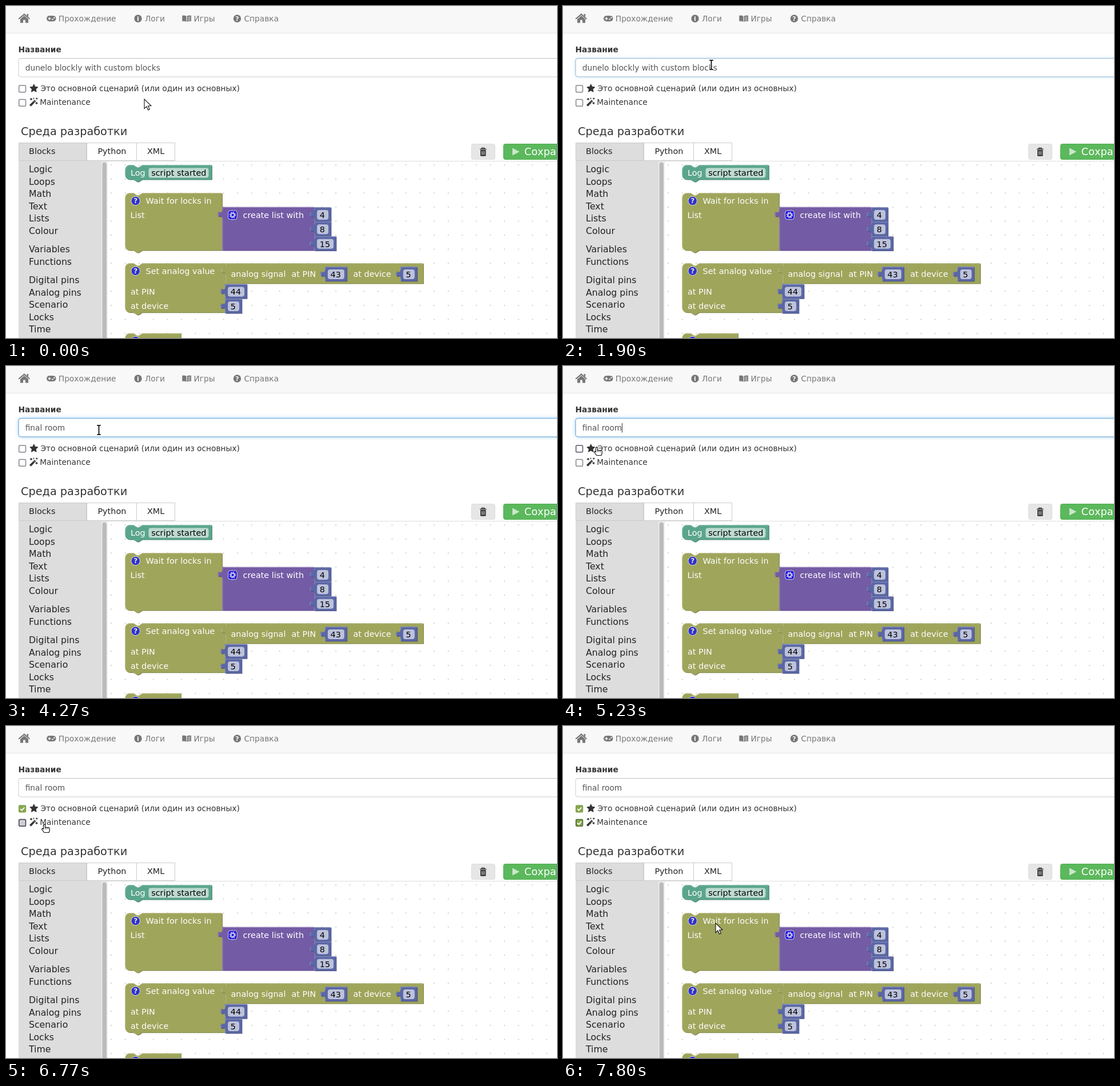
These frames come from a looping animation (964 px wide and 581 px high, 8000 ms). An HTML page:

```html
<!DOCTYPE html>
<html lang="ru">
<head>
<meta charset="utf-8">
<style>
html, body { margin: 0; width: 100%; height: 100%; overflow: hidden; background: #fff; }
svg { display: block; position: fixed; left: 0; top: 0; width: 100%; height: 100%; }
text { font-family: "DejaVu Sans", sans-serif; white-space: pre; }
</style>
</head>
<body>
<svg id="stage" viewBox="0 0 964 581"></svg>
<script>
const LOOP = 8000;
const stage = document.getElementById('stage');

const text = (x, y, s, size, fill, extra = '') =>
  `<text x="${x}" y="${y}" font-size="${size}" fill="${fill}" ${extra}>${s}</text>`;
const rect = (x, y, w, h, fill, extra = '') =>
  `<rect x="${x}" y="${y}" width="${w}" height="${h}" fill="${fill}" ${extra}/>`;
const path = (d, fill, extra = '') => `<path d="${d}" fill="${fill}" ${extra}/>`;

// Blocks
const OLIVE = ['#9fa55b', '#7f8449', '#bcc08c'];
const TEAL = ['#5ba58c', '#498470', '#8cc0ae'];
const PURPLE = ['#745ba5', '#5d4984', '#9e8cc0'];
const BLUE = ['#5b67a5', '#495284', '#8c95c0'];
const TAB_UP = 'V20c0-10-8 2.5-8-7.5s8 2.5 8-7.5';

function shape(x, y, [fill, dark, light], body, shine) {
  return `<g transform="translate(${x} ${y})">` +
    path(body, dark, 'transform="translate(1 1)"') + path(body, fill) +
    path(shine, 'none', `stroke="${light}"`) + '</g>';
}
function stack(x, y, w, h, color) {
  const top = `A8 8 0 0 1 8 0H15l6 4h3l6-4H${w}`;
  return shape(x, y, color,
    `M0 8${top}V${h}H29.5l-6 4h-3l-6-4H8A8 8 0 0 1 0 ${h - 8}Z`,
    `M.5 ${h - 8}V8A7.5 7.5 0 0 1 8 .5H15l6 4h3l6-4H${w}`);
}
function value(x, y, w, h, color) {
  return shape(x, y, color,
    `M0 0H${w}V${h}H0${TAB_UP}Z`,
    `M.5 ${h}V20M-6.8 15.5q-1.6-6.5 1.8-5.6M.5 5V.5H${w}`);
}
const label = (x, y, s) => text(x, y, s, 14.42, '#fff');
const field = (x, y, w, s) =>
  rect(x, y, w, 17, '#fff', 'rx="4" fill-opacity=".6"') + text(x + 4.7, y + 13.8, s, 14.42, '#000');
function number(x, y, n) {
  const w = n > 9 ? 38 : 29;
  return value(x, y, w, 25, BLUE) + field(x + 4.7, y + 4.7, w - 9, n);
}
const help = y => `<g opacity=".7"><circle cx="226.7" cy="${y}" r="7.8" fill="#00f" stroke="#fff"/>` +
  text(226.7, y + 4.3, '?', 12, '#fff', 'text-anchor="middle" font-weight="bold"') + '</g>';

function gear(x, y) {
  return `<g opacity=".7" transform="translate(${x} ${y})">` +
    rect(-7.8, -7.8, 15.6, 15.6, '#00f', 'rx="4" stroke="#fff"') +
    '<circle r="3.2" fill="none" stroke="#fff" stroke-width="2"/>' +
    '<circle r="4.9" fill="none" stroke="#fff" stroke-width="1.6" stroke-dasharray="1.93 1.92"/></g>';
}

function workspace() {
  const step = 24.57;
  let s = '';
  for (let y = 277.3; y < 581; y += step)
    for (let x = 183.2; x < 964; x += step)
      s += rect(x.toFixed(1), y.toFixed(1), 1.8, 1.8, '#c8c8c8');
  s += stack(208.4, 278.3, 151.5, 25.2, TEAL) + label(218, 297, 'Log') + field(249.5, 283.5, 105, 'script started');

  s += stack(208.4, 327.3, 169.6, 100.2, OLIVE) + help(341) +
    label(244.5, 346, 'Wait for locks in') + label(217.5, 370.5, 'List') +
    value(378.4, 351.8, 160.6, 75.7, PURPLE) + gear(396.5, 365.8) + label(414.5, 371, 'create list with') +
    number(539.4, 352.2, 4) + number(539.4, 377.6, 8) + number(539.4, 403, 15);

  s += stack(208.4, 450.2, 175.4, 86, OLIVE) + help(463.7) +
    label(244.5, 469, 'Set analog value') + label(218, 505, 'at PIN') + label(218, 530, 'at device') +
    value(384, 450.2, 346, 35.2, OLIVE) +
    label(393.5, 474, 'analog signal') + label(499.5, 474, 'at PIN') + label(607.5, 474, 'at device') +
    number(558.2, 456.3, 43) + number(690.2, 456.3, 5) +
    number(383.4, 486.7, 44) + number(383.4, 512.4, 5);

  return s + stack(208.4, 572.8, 97.5, 60, OLIVE) + help(586);
}

// Page around the workspace
function navbar() {
  const grey = '#777';
  const disc = (x, c) => `<circle cx="${x}" cy="22" r="6.7" fill="${grey}"/>` +
    text(x, 26.2, c, 11, '#f8f8f8', 'text-anchor="middle" font-weight="bold"');
  const items = [[91.8, 'Прохождение'], [243, 'Логи'], [328.5, 'Игры'], [416.5, 'Справка']];
  return rect(0, 0, 964, 47, '#f8f8f8') + rect(0, 47, 964, 1, '#e7e7e7') +
    path('M21.5 22L32 13 42 22 40.8 23.5 32 16 22.8 23.5ZM36.5 14h2.7v5l-2.7-2.3ZM25 23L32 17l7 6v6.5h-5v-5h-4v5h-5Z', grey) +
    rect(71, 17, 16.5, 10, grey, 'rx="5"') +
    path('M73.5 22h5M76 19.5v5', 'none', 'stroke="#f8f8f8" stroke-width="1.6"') +
    '<circle cx="81.6" cy="23.4" r="1.2" fill="#f8f8f8"/><circle cx="84.2" cy="20.8" r="1.2" fill="#f8f8f8"/>' +
    disc(231, 'i') + disc(404.5, '?') +
    path('M308.3 16.8q4-1 7.2 1v10q-3.2-1.8-7.2-1Z', grey) +
    path('M316.7 17.8q3.2-2 7.3-1v10q-4-.8-7.3 1Z', grey) +
    path('M318.3 20l4.2-1M318.3 22.5l4.2-1M318.3 25l4.2-1', 'none', 'stroke="#f8f8f8" stroke-width=".9"') +
    items.map(([x, s]) => text(x, 27, s, 13.76, grey)).join('');
}

function star(cx, cy, r) {
  const pts = [];
  for (let i = 0; i < 10; i++) {
    const a = i * Math.PI / 5, k = i % 2 ? r * .48 : r;
    pts.push((cx + k * Math.sin(a)).toFixed(1) + ',' + (cy - k * Math.cos(a)).toFixed(1));
  }
  return `<polygon points="${pts.join(' ')}" fill="#333" stroke="#333" stroke-linejoin="round"/>`;
}

function form() {
  const ink = '#333';
  return text(21.5, 81, 'Название', 13.76, ink, 'font-weight="bold"') +
    rect(22, 91.5, 980, 32.5, '#66afe9', 'id="glow" rx="5" filter="url(#blur)"') +
    rect(22, 91.5, 980, 32.5, '#fff', 'rx="4" stroke="#ccc"') +
    rect(24, 92, 960, 1, '#000', 'opacity=".06"') +
    rect(22, 91.5, 980, 32.5, 'none', 'id="edge" rx="4" stroke="#66afe9"') +
    text(33.7, 112.5, '', 13.76, '#555', 'id="title"') +
    rect(0, 100, 1, 16.5, '#333', 'id="caret"') +
    '<g id="check0"></g><g id="check1"></g>' +
    star(48.8, 144.3, 7.4) +
    path('M42.3 174.4L51.2 165.5', 'none', `stroke="${ink}" stroke-width="3.6"`) +
    path('M48.2 166.6l2 2', 'none', 'stroke="#fff" stroke-width=".9"') +
    path('M44 161v4M42 163h4M53.5 168v4M51.5 170h4M53.8 160.5v3M52.3 162h3M48.5 160.5v2.5', 'none', `stroke="${ink}" stroke-width="1.4"`) +
    text(60.5, 149, 'Это основной сценарий (или один из основных)', 13.76, ink) +
    text(59.2, 173.3, 'Maintenance', 13.76, ink) +
    text(26, 226, 'Среда разработки', 19.3, ink);
}

function toolbar() {
  const tab = (x, w, tx, s, fill) => rect(x + .5, 239.5, w, 31, fill, 'stroke="#ccc"') +
    text(tx, 259, s, 14.42, '#222');
  return rect(22, 271, 942, 1, '#ddd') +
    tab(22, 118, 40, 'Blocks', '#ddd') + tab(141, 87, 160.4, 'Python', '#fff') + tab(228, 67, 247, 'XML', '#fff') +
    rect(814.5, 241.5, 41, 27, '#e6e6e6', 'rx="3" stroke="#ddd"') +
    path('M829 250.5h11.5M832.5 250v-1.5h4.5v1.5', 'none', 'stroke="#333" stroke-width="1.5"') +
    path('M830 252h9.5v9.5q0 1.2-1.2 1.2h-7.1q-1.2 0-1.2-1.2Z', '#333') +
    path('M832.5 254v6.5M834.75 254v6.5M837 254v6.5', 'none', 'stroke="#e6e6e6" stroke-width=".9"') +
    rect(870.5, 241.5, 130, 27, '#5cb85c', 'rx="3" stroke="#4cae4c"') +
    path('M886 248.5L898.5 255 886 261.5Z', '#c9e8c9') +
    text(906.8, 261, 'Сохранить', 17.7, '#fff');
}

function toolbox() {
  const groups = [['Logic', 'Loops', 'Math', 'Text', 'Lists', 'Colour'], ['Variables', 'Functions'],
    ['Digital pins', 'Analog pins', 'Scenario', 'Locks', 'Time']];
  let s = rect(22, 271, 145, 310, '#ddd') + rect(167, 272, 11, 309, '#ededed') +
    rect(168.5, 273.5, 7.5, 330, '#bbb', 'rx="3.7"');
  let y = 291;
  for (const names of groups) {
    for (const name of names) {
      s += text(40, y.toFixed(1), name, 15.73, '#222');
      y += 21.55;
    }
    y += 10.8;
  }
  return s;
}

const BEAM = 'M-3.2-8.2h2.2l1 1 1-1h2.2M0-7.2V7.2M-3.2 8.2h2.2l1-1 1 1h2.2';
const CURSORS = {
  arrow: path('M0 0V16.5L3.9 12.9 6.7 19 9.3 17.9 6.6 11.9 11.8 11.6Z', '#fff', 'stroke="#111" stroke-width="1.1"'),
  beam: path(BEAM, 'none', 'stroke="#fff" stroke-width="3.6"') + path(BEAM, 'none', 'stroke="#111" stroke-width="1.8"'),
  hand: path('M-1.5.7Q0-1 1.5.7V5.5H7.5Q9.3 5.7 9.3 7.5V11L8 14.5H0L-4.3 9Q-4.5 7.2-2.8 7.4L-1.5 8.4Z', '#fff', 'stroke="#111" stroke-width="1.2"') +
    path('M1.5 6v2.5M4 6v2.5M6.6 6v2.5', 'none', 'stroke="#111" stroke-width=".9"')
};

stage.innerHTML = '<defs><filter id="blur" x="-5%" y="-60%" width="110%" height="220%">' +
  '<feGaussianBlur stdDeviation="3.9"/></filter></defs>' +
  rect(0, 0, 964, 581, '#fff') + navbar() + form() + workspace() + toolbox() + toolbar() +
  Object.entries(CURSORS).map(([k, s]) => `<g id="${k}">${s}</g>`).join('');

// Tracks of [start time, value]; each value holds until the next
const TITLE = [[0, 'dunelo blockly with custom blocks'], [2030, 'f'], [2230, 'fin'], [2500, 'fina'],
  [2830, 'final'], [3030, 'final '], [3300, 'final r'], [3430, 'final ro'], [3530, 'final roo'], [3630, 'final room']];
const GLOW = [[0, 0], [1900, .5], [2030, 1], [5470, .7], [5600, .25], [5700, 0]];
const CARET = [[0, 0], [2030, 1], [3630, 0], [4570, 1], [5470, 0]];
const CHECKS = [
  [[0, 'off'], [5470, 'press'], [5600, 'focus'], [6770, 'on']],
  [[0, 'off'], [6770, 'press'], [6970, 'focus']]
];
const MOUSE = [[0, [242, 163]]];
for (let i = 1; i <= 8; i++) {
  const p = i / 8, e = p * p * (3 - 2 * p);
  MOUSE.push([467 + i * 33, [242 + 17.5 * e, 163 - 60 * e]]);
}
MOUSE.push([4270, [162.5, 112]], [4370, [150, 117]], [4470, [132, 127]], [4570, [112, 140]], [4700, [94, 152]],
  [4830, [83, 157]], [5130, [68, 148]], [5230, [59, 142]],
  [5870, [60, 150]], [5970, [64, 164]], [6070, [67, 172]],
  [7170, [88, 181]], [7270, [150, 213]], [7370, [245, 268]], [7470, [325, 312]], [7570, [345, 330]],
  [7700, [295, 342]], [7800, [267, 345]]);

function at(track, t) {
  let v = track[0][1];
  for (const [start, next] of track) if (start <= t) v = next;
  return v;
}

function rowUnder(x, y) {
  if (y > 133 && y < 160 && x < 408) return 0;
  return y >= 160 && y < 181 && x < 147 ? 1 : -1;
}

function checkbox(y, state, hover) {
  const done = state === 'on' || state === 'focus';
  const fill = done ? '#86a650' : state === 'press' ? '#cfcfd8' : '#fff';
  const edge = state === 'focus' ? '#4f6b26' : done ? '#86a650' : state === 'press' ? '#3c3c46' : hover ? '#55556a' : '#85858f';
  return rect(22.7, y, 11.8, 11.8, fill, `rx="1.5" stroke="${edge}" stroke-width="1.5"`) +
    (done ? path(`M25.2 ${y + 6}l2.5 2.7 4.6-5.2`, 'none', 'stroke="#fff" stroke-width="1.8"') : '');
}

const el = id => document.getElementById(id);
const set = (id, name, v) => el(id).setAttribute(name, v);

function draw(t) {
  const [x, y] = at(MOUSE, t);
  const row = rowUnder(x, y);
  const kind = row >= 0 ? 'hand' : y > 91 && y < 124 ? 'beam' : 'arrow';
  for (const k in CURSORS) set(k, 'visibility', k === kind ? 'visible' : 'hidden');
  set(kind, 'transform', `translate(${x} ${y})`);

  const glow = at(GLOW, t);
  set('glow', 'opacity', glow * .6);
  set('edge', 'opacity', glow);

  const title = el('title');
  title.textContent = at(TITLE, t);
  set('caret', 'x', Math.round(33.7 + title.getComputedTextLength() - .3));
  set('caret', 'opacity', at(CARET, t));

  CHECKS.forEach((track, i) => {
    el('check' + i).innerHTML = checkbox(139 + i * 24.5, at(track, t), row === i);
  });
}

const start = performance.now();
function tick() {
  draw((performance.now() - start) % LOOP);
  requestAnimationFrame(tick);
}
tick();
</script>
</body>
</html>
```
